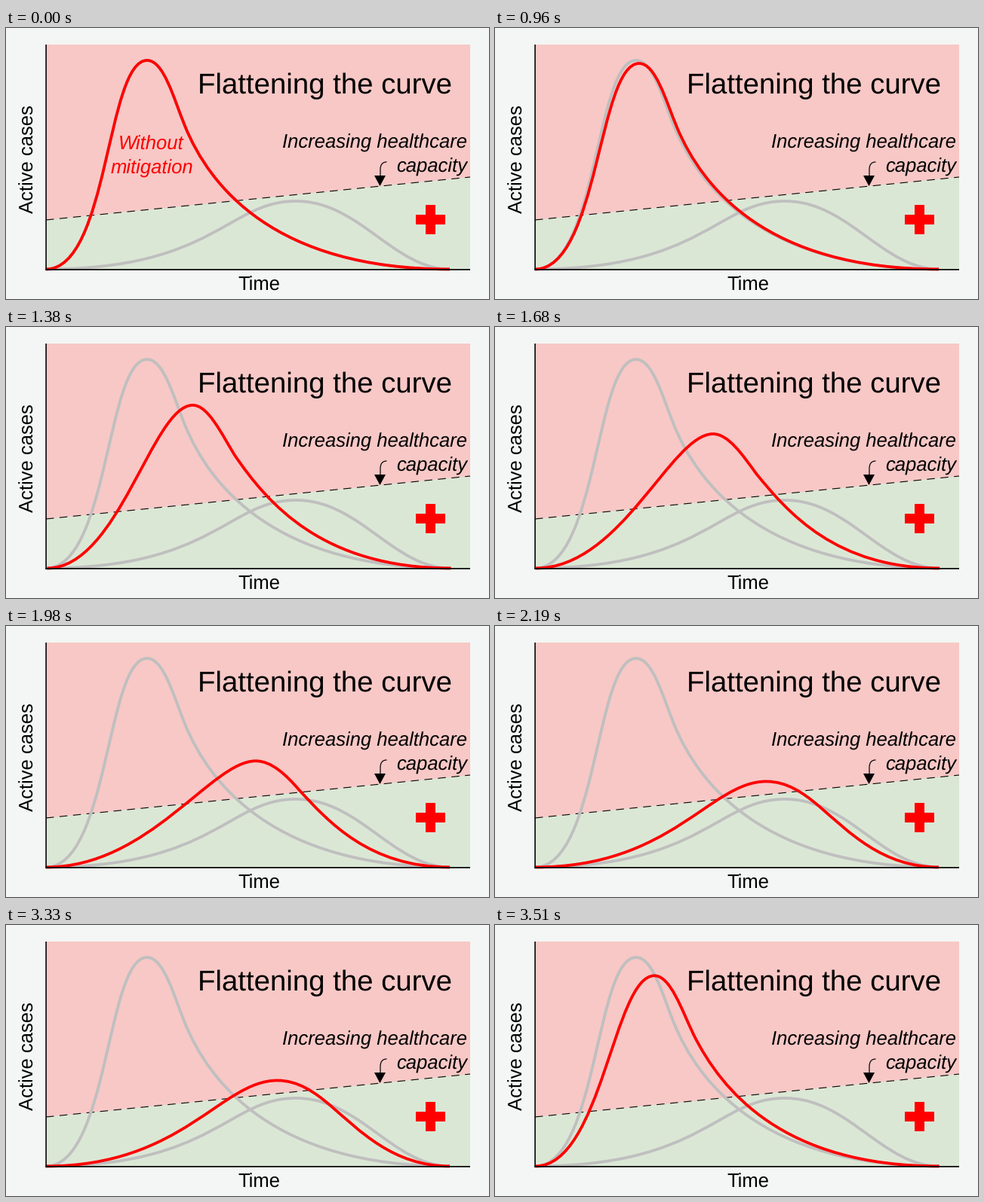
Write a matplotlib script that moves like this. It is 640 px wide and 360 px high and loops after 3.54 s.

```python
import numpy as np
import matplotlib.pyplot as plt
from matplotlib.animation import FuncAnimation
from matplotlib.patches import PathPatch, Polygon, Rectangle
from matplotlib.path import Path

W, H, DPI = 640, 360, 100
PX = 72 / DPI  # points per pixel
STEP_MS, FRAMES = 30, 118

BACK, PINK, GREEN = "#f3f6f4", "#f7c8c6", "#dbe7d5"
RED, OLIVE, GREY = "#ff0000", "#6b6b0c", "#bfbfbf"

LEFT, RIGHT, TOP, BASE = 53, 615, 22, 321
END_Y = 320.4

plt.rcParams["font.family"] = "Liberation Sans"
plt.rcParams["text.hinting"] = "none"
plt.rcParams["lines.scale_dashes"] = False


def pose(x, peak, p2, knee, p4):
    """Ten Bezier points: rise, shoulder and tail of one curve."""
    y = [END_Y, END_Y, peak, peak, peak, p2, knee, p4, END_Y, END_Y]
    return np.column_stack([x, y])


# Poses of the curve and the step at which each is reached
POSE_STEPS = [0, 18, 36, 48]
POSES = [
    pose([53, 136, 133, 187, 209, 222, 237, 270, 356, 588], 43, 93, 130, 211),
    pose([55, 152, 206, 259.5, 279, 297, 316, 362, 432, 590], 116, 149, 178, 239),
    pose([53, 192, 276, 335, 356, 375, 393, 431, 484, 588], 183, 200, 220.5, 261),
    pose([53, 276, 294, 384, 417, 442, 466, 506, 542, 588], 230, 243, 258.5, 285),
]
LAST = POSE_STEPS[-1]
CURVE_CODES = [Path.MOVETO] + [Path.CURVE4] * 9

HOLD = 32            # frames each end pose stays
FALL_START = HOLD - 1
FLAT = FALL_START + LAST
RETURN_START = FLAT + HOLD - 1
RETURN_SPEED = 6


def curve_path(step):
    i = min(int(np.searchsorted(POSE_STEPS, step, side="right")) - 1, 2)
    a, b = POSE_STEPS[i], POSE_STEPS[i + 1]
    t = (step - a) / (b - a)
    return Path(POSES[i] * (1 - t) + POSES[i + 1] * t, CURVE_CODES)


def step_at(frame):
    if frame <= FLAT:
        return max(0, frame - FALL_START)
    return LAST - RETURN_SPEED * max(0, frame - RETURN_START)


fig = plt.figure(figsize=(W / DPI, H / DPI), dpi=DPI, facecolor=BACK)
ax = fig.add_axes([0, 0, 1, 1])
ax.set_xlim(0, W)
ax.set_ylim(H, 0)
ax.axis("off")


def add_rect(x, y, w, h, color, z, **kw):
    ax.add_patch(Rectangle((x, y), w, h, fc=color, lw=0, zorder=z, **kw))


def add_curve(step, color, z):
    patch = PathPatch(curve_path(step), fc="none", ec=color, lw=3.8 * PX,
                      capstyle="butt", joinstyle="round", zorder=z)
    return ax.add_patch(patch)


def add_text(x, y, text, size=25.6, **kw):
    return ax.text(x, y, text, fontsize=size * PX, va="baseline", zorder=8, **kw)


def add_label(x, y, words, color):
    return [add_text(x + dx, y + dy, word, ha="center", style="italic", color=color)
            for word, dx, dy in zip(words, (0, 0.5), (0, 32))]


# Background zones and capacity line
add_rect(LEFT, TOP, RIGHT - LEFT, BASE - TOP, PINK, 0)
ax.add_patch(Polygon([(LEFT, 255), (RIGHT, 198), (RIGHT, BASE), (LEFT, BASE)],
                     fc=GREEN, lw=0, zorder=1))
ax.plot([LEFT, RIGHT], [255, 198], color="black", lw=1.1 * PX,
        dashes=(10.5 * PX, 7.5 * PX), dash_capstyle="butt", zorder=2)

# Cross
add_rect(556, 235, 13, 39, RED, 2)
add_rect(543, 248, 39, 13, RED, 2)

# Arrow to the capacity line
ax.add_patch(PathPatch(
    Path([(504.5, 178), (498.5, 178), (496, 182), (496, 188), (496, 198)],
         [Path.MOVETO] + [Path.CURVE4] * 3 + [Path.LINETO]),
    fc="none", ec="black", lw=1.2 * PX, zorder=7))
ax.add_patch(Polygon([(488, 196), (503, 196), (495.5, 210)], fc="black", lw=0, zorder=7))

# Curves
add_curve(0, GREY, 3)
add_curve(LAST, GREY, 3)
cover = ax.add_patch(PathPatch(curve_path(LAST), fc=GREEN, lw=0, zorder=4))
curve = add_curve(0, RED, 5)

# Axes
add_rect(LEFT - 0.7, TOP, 1.6, BASE - TOP + 0.8, "black", 6, snap=False)
add_rect(LEFT - 0.7, BASE - 0.9, RIGHT - LEFT + 0.7, 1.7, "black", 6, snap=False)

# Text
add_text(254.5, 87, "Flattening the curve", 38.4)
add_text(611, 160, "Increasing healthcare", ha="right", style="italic")
add_text(611, 192, "capacity", ha="right", style="italic")
add_text(335, 349, "Time", ha="center")
ax.text(37, 246, "Active cases", fontsize=25.6 * PX, rotation=90,
        rotation_mode="anchor", ha="left", va="baseline", zorder=8)
steep_label = add_label(192.5, 162, ("Without", "mitigation"), RED)
flat_label = add_label(390, 269, ("With", "mitigation"), OLIVE)


def draw(frame):
    step = step_at(frame)
    flat = step == LAST
    curve.set_path(curve_path(step))
    curve.set_edgecolor(OLIVE if flat else RED)
    cover.set_visible(flat)
    for text in steep_label:
        text.set_visible(step == 0)
    for text in flat_label:
        text.set_visible(flat)
    return [curve, cover, *steep_label, *flat_label]


anim = FuncAnimation(fig, draw, frames=FRAMES, interval=STEP_MS,
                     repeat=True, repeat_delay=0, blit=False)
plt.show()
```
